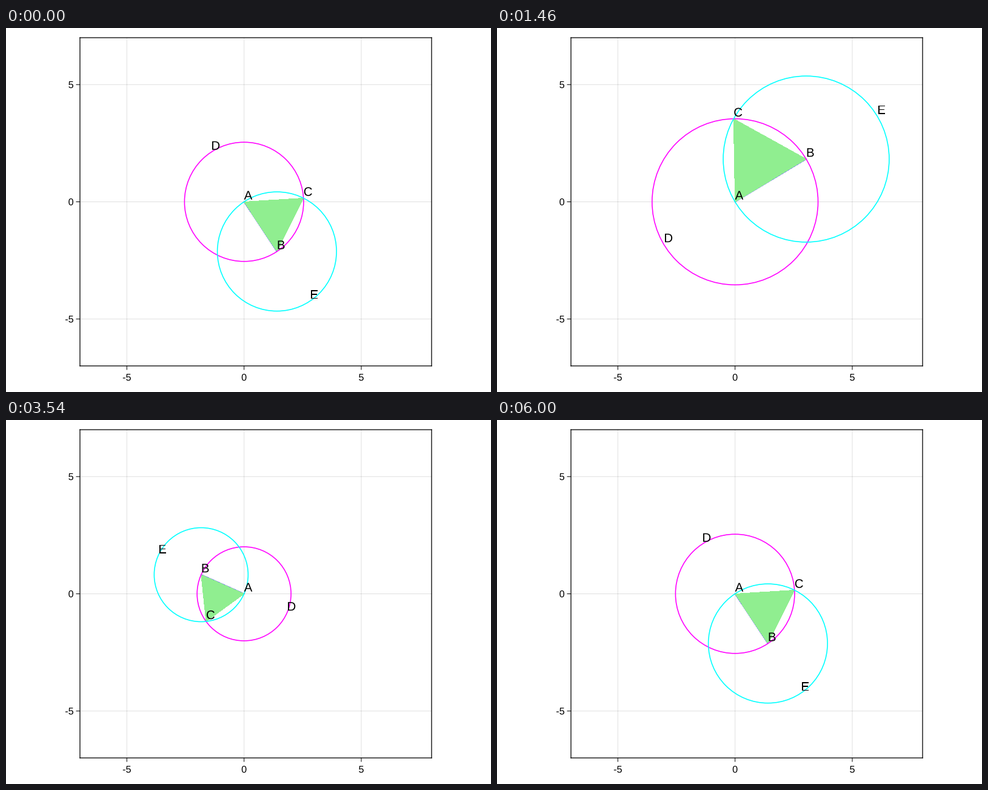
Animation of 800x600 px, one loop 6.04 s. Source, as a matplotlib script:

```python
import numpy as np
import matplotlib.pyplot as plt
from matplotlib.animation import FuncAnimation
from matplotlib.patches import Circle, PathPatch, Polygon
from matplotlib.textpath import TextPath
from matplotlib.transforms import Affine2D

DPI = 100
PX = 72 / DPI                    # one pixel in points
LOOP, TICK = 6040, 20            # ms
FPS, STEPS = 24, 144             # pose changes per second, poses per turn
LEFT, RIGHT, BOTTOM, TOP = 122, 702, 43, 584
UNIT = np.array([(RIGHT - LEFT) / 15, (TOP - BOTTOM) / 14])
ORIGIN = np.array([LEFT, BOTTOM]) + 7 * UNIT
START, RADIUS = np.radians(-56.5), 2.541

fig = plt.figure(figsize=(8, 6), dpi=DPI, facecolor="white")
ax = fig.add_axes([0, 0, 1, 1])
ax.set(xlim=(0, 800), ylim=(0, 600))
ax.axis("off")


def to_px(p):
    return ORIGIN + UNIT * np.asarray(p)


def polar(r, a):
    return np.array([r * np.cos(a), r * np.sin(a)])


def stroke(xs, ys, width=1.0, color="black", z=1, **kw):
    return ax.plot(xs, ys, color=color, lw=width * PX, zorder=z,
                   snap=False, **kw)[0]


def glyphs(text, size):
    path = TextPath((0, 0), text, size=size, prop={"family": "Liberation Sans"})
    return ax.add_patch(PathPatch(path, fc="black", lw=0, zorder=9))


def place(patch, x, y):
    patch.set_transform(Affine2D().translate(x, y) + ax.transData)


def tick_label(text, x, y, align):
    patch = glyphs(text, 16.2)
    box = patch.get_path().get_extents()
    shift = box.x1 if align == "right" else (box.x0 + box.x1) / 2
    place(patch, x - shift, y - 5.7)


def ring(color):
    return ax.add_patch(Circle((0, 0), 1, fill=False, ec=color,
                               lw=1.6 * PX, zorder=5))


for v in (-5, 0, 5):
    x, y = to_px((v, v))
    stroke([x, x], [BOTTOM, TOP], alpha=0.12)
    stroke([LEFT, RIGHT], [y, y], alpha=0.12)
    stroke([x, x], [BOTTOM - 6.5, BOTTOM], z=2, solid_capstyle="butt")
    stroke([LEFT - 6.5, LEFT], [y, y], z=2, solid_capstyle="butt")
    tick_label(str(v), x, 24.4, "center")
    tick_label(str(v), 111, y, "right")

for x in (LEFT, RIGHT):
    stroke([x, x], [BOTTOM, TOP], 1.3, z=2)
for y in (BOTTOM, TOP):
    stroke([LEFT, RIGHT], [y, y], 1.3, z=2)

segment = stroke([], [], 1.6, "blue", 3)
triangle = ax.add_patch(Polygon(np.zeros((3, 2)), fc="lightgreen", lw=0,
                                antialiased=False, zorder=4))
ring_a, ring_b = ring("magenta"), ring("cyan")
labels = {name: glyphs(name, 20.5) for name in "ABCDE"}


def update(n):
    step = int((n * TICK + TICK / 2 + 5) * FPS / 1000)
    turn = 2 * np.pi * min(step, STEPS) / STEPS
    r = RADIUS + np.sin(turn)
    a = np.zeros(2)
    b = polar(r, START + turn)
    c = polar(r, START + turn + np.pi / 3)

    corners = np.array([to_px(p) for p in (a, b, c)])
    segment.set_data(corners[:2, 0], corners[:2, 1])
    triangle.set_xy(corners)
    for circle, center in ((ring_a, corners[0]), (ring_b, corners[1])):
        circle.set_center(center)
        circle.set_radius(r * UNIT[0])
    for name, p in zip("ABCDE", (a, b, c, -b, 2 * b)):
        x, y = to_px(p)
        place(labels[name], x, y + 3.8)
    return [segment, triangle, ring_a, ring_b, *labels.values()]


anim = FuncAnimation(fig, update, frames=LOOP // TICK, interval=TICK,
                     repeat=True, repeat_delay=0, cache_frame_data=False)
plt.show()
```
